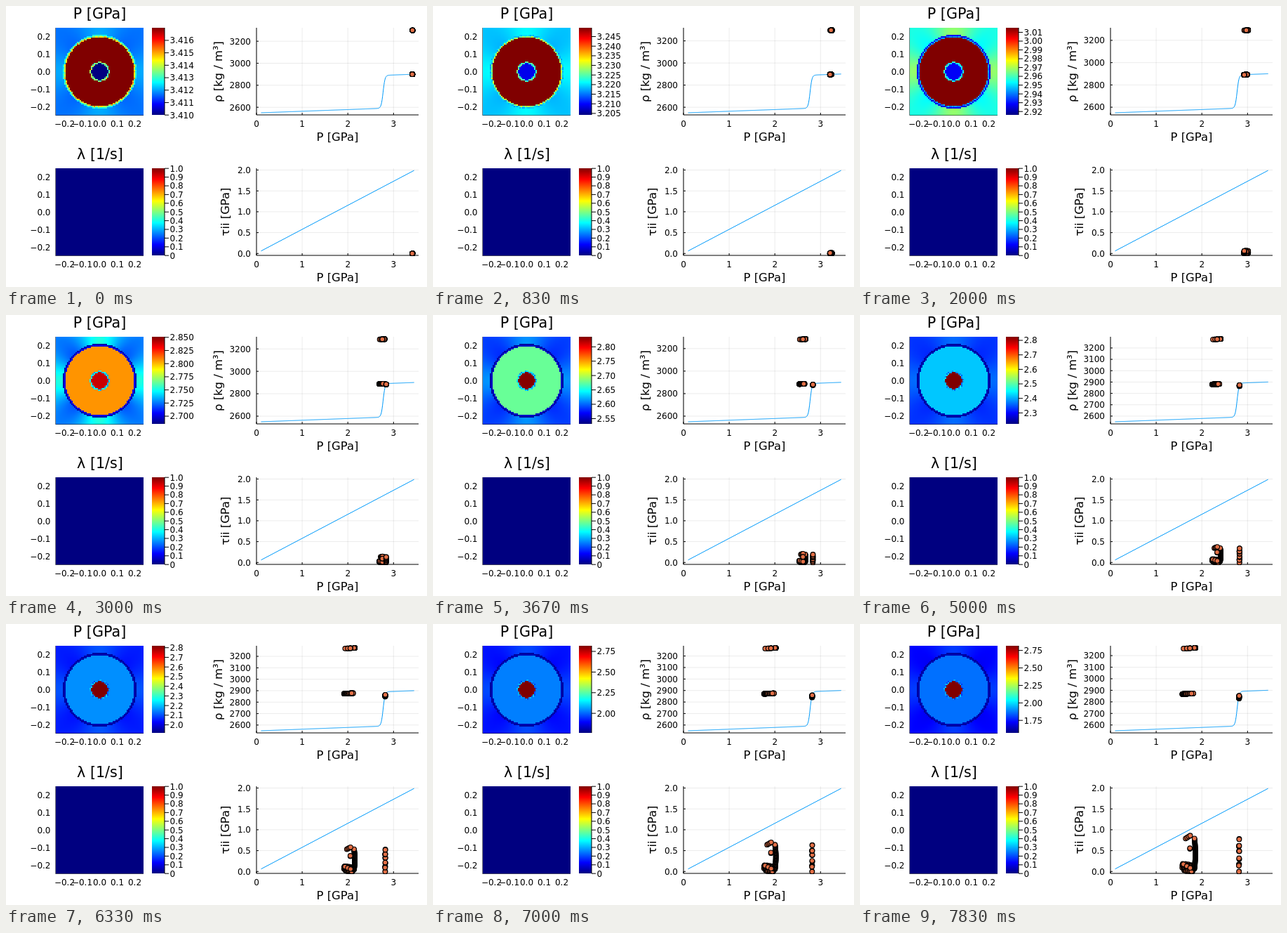
Write an HTML page with a canvas that moves like this. It is 600 px wide and 400 px high and loops after 8 s.

```html
<!DOCTYPE html>
<html lang="en">
<head>
<meta charset="utf-8">
<style>
html, body { margin: 0; width: 100%; height: 100%; overflow: hidden; background: #fff; }
canvas, svg { position: absolute; display: block; }
canvas { left: 71px; top: 31px; width: 125px; height: 124.5px; image-rendering: pixelated; }
svg { left: 0; top: 0; }
text { font: 12px "DejaVu Sans", sans-serif; fill: #000; }
text.title { font-size: 20.7px; }
text.label { font-size: 16.4px; }
.grid { stroke: #000; stroke-opacity: .08; fill: none; }
.axis { stroke: #000; fill: none; }
.edge { stroke: #000; stroke-opacity: .5; fill: none; }
.curve { stroke: #009afa; fill: none; }
circle { fill: #e26f46; stroke: #000; stroke-width: 1.15; }
</style>
</head>
<body>
<canvas id="field" width="63" height="63"></canvas>
<svg width="600" height="400" viewBox="0 0 600 400">
  <defs>
    <linearGradient id="jet" x1="0" y1="1" x2="0" y2="0"></linearGradient>
    <clipPath id="top"><rect x="357" y="30" width="231" height="126"/></clipPath>
    <clipPath id="low"><rect x="357" y="230" width="231" height="126"/></clipPath>
  </defs>
  <g id="fixed"></g>
  <g id="bar"></g>
  <g id="density"></g>
  <g id="rhoDots" clip-path="url(#top)"></g>
  <g id="tauDots" clip-path="url(#low)"></g>
</svg>
<script>
const $ = id => document.getElementById(id);
const LOOP = 8000, FPS = 6, LAST = 47, N = 63;
const clamp = (v, a = 0, b = 1) => Math.min(b, Math.max(a, v));
const bell = x => Math.exp(-x * x);

// Piecewise linear through [step, value] pairs
const track = (...keys) => f => {
  let i = 0;
  while (i < keys.length - 2 && f > keys[i + 1][0]) i++;
  const [[a, p], [b, q]] = keys.slice(i);
  return p + (q - p) * (f - a) / (b - a);
};

// Pressures: the core stops falling once it reaches the phase change
const lowP = track([0, 3.41], [12, 2.916], [LAST, 1.569]);
const ringP = track([0, 3.417], [12, 3.015], [18, 2.806], [LAST, 1.862]);
const coreP = f => f < 14 ? 3.41 - .0402 * f : 2.81 + .037 * Math.exp((14 - f) / 16);
const highP = f => Math.max(ringP(f), coreP(f) + .012 * bell((f - 18) / 3));

const ringRho = f => 3300 - .77 * f;
const matrixRho = f => 2900 - .62 * f;
const coreRho = f => 2900 - .72 * f - .0113 * f * f;
const maxTau = f => .86 * (f / LAST) ** 1.85;

// Positions on the colour scale
const matrixV = track([0, .26], [12, .45], [22, .22], [LAST, .15]);
const lobeV = f => .035 + .08 * bell((f - 16) / 5);
const rimInV = f => .05 + .58 * bell(f / 12);
const rimOutV = f => .03 + .37 * bell(f / 10);
const coreRimV = f => .2 + .3 * Math.exp(-f / 25);

const jet = v => [3, 2, 1].map(c => Math.round(255 * clamp(1.5 - Math.abs(4 * v - c))));
const px = p => 357 + 65.1 * p;
const tauY = t => 352.3 - 59.4 * t;

const line = (x1, y1, x2, y2, cls) => `<path class="${cls}" d="M${x1} ${y1}L${x2} ${y2}"/>`;
const text = (s, x, y, anchor = 'middle', cls = '', extra = '') =>
  `<text x="${x}" y="${y}" text-anchor="${anchor}" class="${cls}" ${extra}>${s}</text>`;
const upright = (s, x, y) => text(s, x, y, 'middle', 'label', `transform="rotate(-90 ${x} ${y})"`);
const num = (v, d) => v.toFixed(d).replace('-', '−');
const barTick = (s, y) => line(226, y, 232, y, 'axis') + text(s, 233.5, y + 4.4, 'start');
const yTick = (s, y) =>
  line(357, y, 588, y, 'grid') + line(357, y, 360, y, 'axis') + text(s, 349, y + 4.4, 'end');

function drawFixed() {
  $('jet').innerHTML = [0, 1, 3, 5, 7, 8].map(k =>
    `<stop offset="${k / 8}" stop-color="rgb(${jet(k / 8)})"/>`).join('');
  let s = text('P [GPa]', 133.5, 18.3, 'middle', 'title') + text('λ [1/s]', 134, 218.3, 'middle', 'title');
  s += '<rect x="71" y="231" width="125" height="124.5" fill="#000080"/>';
  for (const y of [0, 200]) {
    s += `<path class="edge" d="M70.5 ${y + 31}V${y + 155.5}H196"/>`;
    s += `<rect x="208" y="${y + 31}" width="18" height="124" fill="url(#jet)"/>`;
    s += line(226, y + 31, 226, y + 155, 'axis');
    for (let k = -2; k <= 2; k++) {
      s += text(num(k / 10, 1), 133.5 + 25 * k, y + 171.5);
      s += text(num(k / 10, 1), 63.5, y + 97.5 - 25 * k, 'end');
    }
    for (let p = 0; p < 4; p++) {
      const x = px(p);
      s += line(x, y + 31, x, y + 155, 'grid') + line(x, y + 155, x, y + 152, 'axis');
      s += text(p, x, y + 171.5);
    }
    s += `<path class="axis" d="M357 ${y + 31}V${y + 155}H588"/>`;
    s += text('P [GPa]', 472.5, y + 192, 'middle', 'label');
  }
  for (let k = 0; k <= 10; k++) s += barTick(k ? (k / 10).toFixed(1) : '0', 355.2 - 12.4 * k);
  for (let k = 0; k < 5; k++) s += yTick((k / 2).toFixed(1), tauY(k / 2));
  s += upright('ρ [kg / m³]', 307.7, 93.5) + upright('τii [GPa]', 318.2, 293);
  s += line(px(.1), tauY(.06), px(3.45), tauY(1.99), 'curve');
  $('fixed').innerHTML = s;
}

let seed = 7;
const rand = () => (seed = seed * 16807 % 2147483647) / 2147483647;

// Markers: kind, pressure fraction u, stress fraction w
const points = [];
const add = (count, kind, place) => {
  for (let i = 0; i < count; i++) {
    const [u, w] = place(i / (count - 1));
    points.push({ kind, u, w });
  }
};
add(70, 'matrix', k => [.84 * k, .11 + .08 * Math.sin(26 * k) - .05 * k + .04 * rand()]);
add(6, 'matrix', k => [.3 + .4 * k, .02 * rand()]);
add(44, 'ring', k => [.92 + .07 * Math.sin(Math.PI * k), .08 + .84 * k]);
add(4, 'ring', k => [.26 + .34 * k, .92 + .08 * k]);
add(3, 'ring', k => [.1 + .5 * k, .2 - .1 * k]);
add(2, 'ring', k => [.58, .63 + .02 * k]);
add(18, 'core', k => [2 * rand() - 1, .91 * Math.round(5 * k) / 5 + .05 * (rand() - .5) * (k > 0)]);

const makeDots = id => {
  $(id).innerHTML = '<circle r="3.3"/>'.repeat(points.length);
  return [...$(id).children];
};
const rhoDots = makeDots('rhoDots'), tauDots = makeDots('tauDots');

const jitter = Array.from({ length: N * N }, () => rand() - .5);
const ctx = $('field').getContext('2d');
const img = ctx.createImageData(N, N);

function drawField(f, lo, hi) {
  const frac = p => (p - lo) / (hi - lo);
  const core = frac(coreP(f)), ring = frac(ringP(f));
  const base = matrixV(f), lobe = lobeV(f), inner = rimInV(f), outer = rimOutV(f), coreRim = coreRimV(f);
  const rough = .25 * clamp(1 - f / 20);
  for (let j = 0; j < N; j++) for (let i = 0; i < N; i++) {
    const x = (i + .5) / N * .5 - .25, y = (j + .5) / N * .5 - .25;
    const r = Math.hypot(x, y), n = j * N + i;
    let v;
    if (r < .05) v = core;
    else if (r < .0575) v = coreRim + jitter[n] * .15;
    else if (r < .198) v = ring;
    else if (r < .204) v = inner + jitter[n] * rough;
    else if (r < .211) v = outer + jitter[n] * rough * .5;
    else v = base + lobe * Math.cos(4 * Math.atan2(y, x)) * .21 / r;
    img.data.set([...jet(clamp(v)), 255], n * 4);
  }
  ctx.putImageData(img, 0, 0);
}

function drawBar(lo, hi) {
  const range = hi - lo;
  let step, digits;
  search: for (let e = 4; e >= 0; e--) for (const m of [1, 2.5, 5]) {
    step = m * 10 ** -e;
    digits = m === 2.5 ? e + 1 : e;
    if (range / step <= 10.5) break search;
  }
  let s = '';
  for (let k = Math.ceil(lo / step); k * step <= hi; k++)
    s += barTick((k * step).toFixed(digits), 155.2 - 124 * (k * step - lo) / range);
  $('bar').innerHTML = s;
}

function drawDensity(f, rhoY) {
  let s = '', d = '';
  const step = f < 26 ? 200 : 100;
  for (let r = 2600; r < 3300; r += step) s += yTick(r, rhoY(r));
  for (let k = 0; k <= 335; k++) {
    const p = .1 + k / 100;
    const rho = 2550 + 15.3 * (p - .1) + 299 / (1 + Math.exp((2.772 - p) / .021));
    d += `${k ? 'L' : 'M'}${px(p).toFixed(2)} ${rhoY(rho).toFixed(2)}`;
  }
  $('density').innerHTML = s + `<path class="curve" d="${d}"/>`;
}

function drawDots(f, rhoY) {
  const lo = lowP(f), span = ringP(f) - lo, tau = maxTau(f), age = f / LAST;
  points.forEach(({ kind, u, w }, i) => {
    let p = lo + u * span, rho;
    if (kind === 'core') {
      p = coreP(f) + u * .006 * age;
      rho = coreRho(f) + (w - .45) * 26 * age * age;
    } else {
      rho = (kind === 'ring' ? ringRho(f) : matrixRho(f)) + (u - .5) * 7 * age;
    }
    const put = (dot, y) => {
      dot.setAttribute('cx', px(p).toFixed(2));
      dot.setAttribute('cy', y.toFixed(2));
    };
    put(rhoDots[i], rhoY(rho));
    put(tauDots[i], tauY(w * tau));
  });
}

function draw(f) {
  const lo = lowP(f), hi = highP(f);
  const rhoY = r => 152 - 117.5 * (r - 2550) / (ringRho(f) - 2550);
  drawField(f, lo, hi);
  drawBar(lo, hi);
  drawDensity(f, rhoY);
  drawDots(f, rhoY);
}

drawFixed();
let shown = -1;
const start = performance.now();
function tick() {
  const t = (performance.now() - start) % LOOP;
  const f = Math.min(LAST, Math.floor((t + 4) * FPS / 1000));
  if (f !== shown) draw(shown = f);
  requestAnimationFrame(tick);
}
tick();
</script>
</body>
</html>
```
